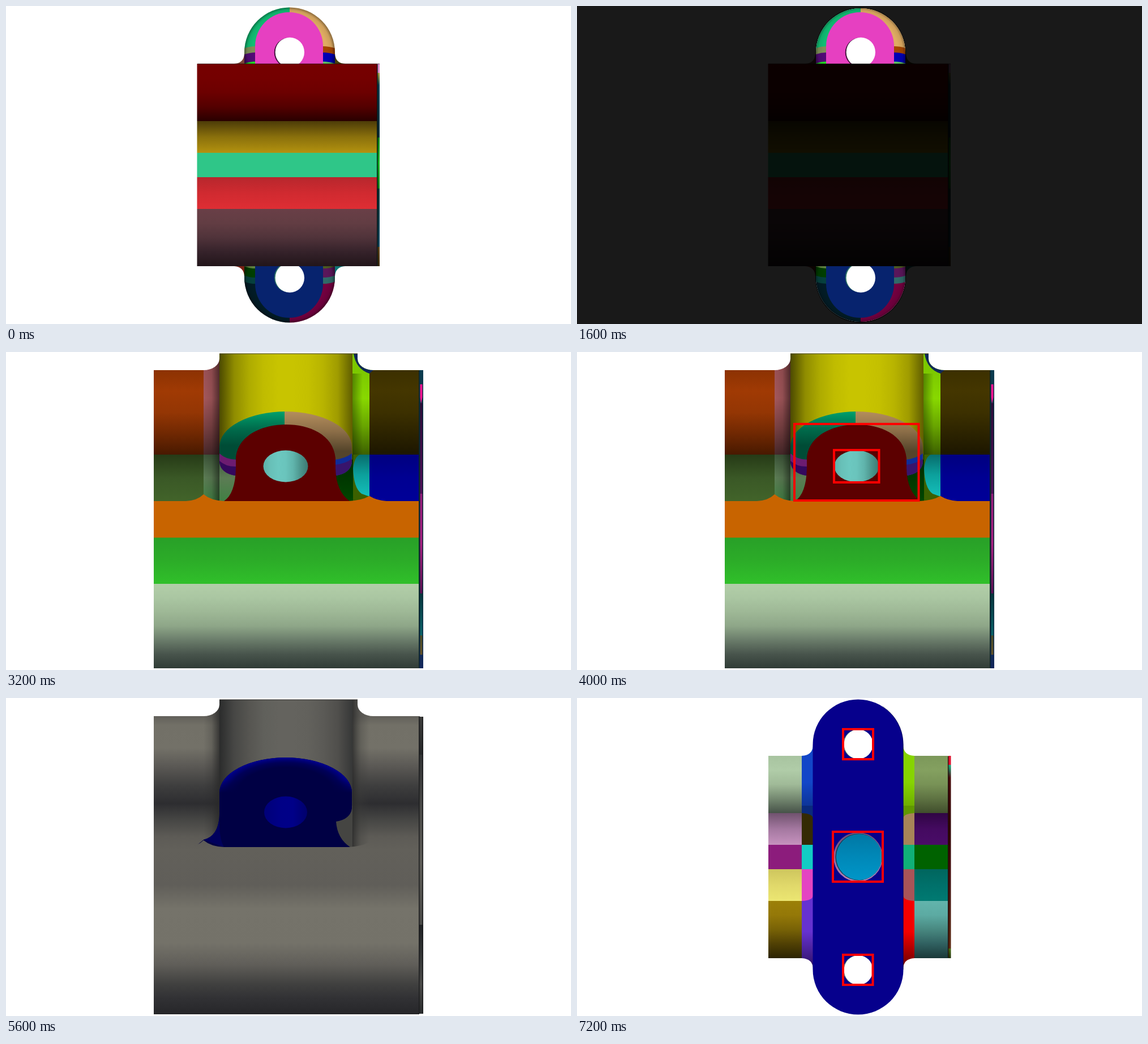
Recreate the animation shown at these times as an HTML page with a canvas. Size 998x561 px, loop 8000 ms.

```html
<!DOCTYPE html>
<html lang="en">
<head>
<meta charset="utf-8">
<title>Part segmentation</title>
<style>
html, body { margin: 0; width: 100%; height: 100%; overflow: hidden; background: #fff; }
canvas { display: block; }
</style>
</head>
<body>
<canvas id="stage" width="998" height="561"></canvas>
<script>
const ctx = document.getElementById('stage').getContext('2d');
const W = 998, H = 561, STEP = 800, TAU = Math.PI * 2;

function ramp(x0, y0, x1, y1, colors) {
  if (colors.length === 1) return colors[0];
  const g = ctx.createLinearGradient(x0, y0, x1, y1);
  colors.forEach((c, i) => g.addColorStop(i / (colors.length - 1), c));
  return g;
}
const down = (y0, y1, ...colors) => ramp(0, y0, 0, y1, colors);
const across = (x0, x1, ...colors) => ramp(x0, 0, x1, 0, colors);

function greyRamp(points) {
  const y0 = points[0][0], y1 = points[points.length - 1][0];
  const g = ctx.createLinearGradient(0, y0, 0, y1);
  for (const [y, v] of points) {
    const blue = v > 60 ? v - (v - 60) * 0.2 : v + 3;
    g.addColorStop((y - y0) / (y1 - y0), `rgb(${v},${v - (v > 90 ? 2 : 0)},${blue})`);
  }
  return g;
}
function rect(x0, y0, x1, y1, fill) {
  ctx.fillStyle = fill;
  ctx.fillRect(x0, y0, x1 - x0, y1 - y0);
}
function bands(x0, x1, list) {
  for (const [y0, y1, ...colors] of list) rect(x0, y0, x1, y1, down(y0, y1, ...colors));
}
function shape(d, fill) {
  ctx.fillStyle = fill;
  ctx.fill(new Path2D(d));
}
function oval(x, y, rx, ry, fill) {
  ctx.fillStyle = fill;
  ctx.beginPath();
  ctx.ellipse(x, y, rx, ry, 0, 0, TAU);
  ctx.fill();
}
function clipped(path, draw) {
  ctx.save();
  ctx.clip(path);
  draw();
  ctx.restore();
}
function flipped(draw) {
  ctx.save();
  ctx.transform(1, 0, 0, -1, 0, H);
  draw();
  ctx.restore();
}
function boxes(...list) {
  ctx.strokeStyle = '#f00';
  ctx.lineWidth = 4;
  for (const [x0, y0, x1, y1] of list) ctx.strokeRect(x0, y0, x1 - x0, y1 - y0);
}
function spotlight(scene, mask) {
  scene();
  rect(0, 0, W, H, 'rgba(0,0,0,0.9)');
  clipped(mask, scene);
}

// Front view
const LUG = 'M421 102V82A80 79.5 0 0 1 581 82V102Z';
const LUG_FLARE = 'M403 102Q420 101 421 84V102ZM599 102Q582 101 581 84V102Z';

function rimShade(strength) {
  const g = ctx.createRadialGradient(501, 82, 66, 501, 82, 80);
  g.addColorStop(0, 'rgba(0,0,0,0)');
  g.addColorStop(0.6, `rgba(0,0,0,${strength * 0.2})`);
  g.addColorStop(1, `rgba(0,0,0,${strength})`);
  rect(420, 0, 582, 103, g);
}
function lug(c) {
  shape('M403 102Q420 101 421 84V102Z', c.flare[0]);
  shape('M599 102Q582 101 581 84V102Z', c.flare[1]);
  clipped(new Path2D(LUG), () => {
    rect(420, 0, 501, 103, c.rim[0]);
    rect(501, 0, 582, 103, c.rim[1]);
    [71, 82, 98].forEach((y, i) => {
      shape(`M420 ${y + 4}Q430 ${y} 441 ${y}V103H420Z`, c.left[i]);
      shape(`M582 ${y + 4}Q572 ${y} 559 ${y}V103H582Z`, c.right[i]);
    });
    rimShade(0.4);
  });
  shape('M440 103V71A60 60 0 0 1 560 71V103Z', c.face);
  oval(499.7, 82, 26, 26, c.bore);
  oval(501.3, 81.5, 25.7, 26, '#fff');
}
function frontColor() {
  rect(0, 0, W, H, '#fff');
  lug({
    flare: ['#7c4638', '#45400c'], rim: ['#10be74', '#dfac62'], face: '#e640c1', bore: '#40103a',
    left: ['#7f9058', '#520b75', '#22e022'], right: ['#a54500', '#0000b4', '#60c462']
  });
  flipped(() => lug({
    flare: ['#7a2014', '#0f7474'], rim: ['#021c26', '#72003f'], face: '#07236e', bore: '#2f7468',
    left: ['#06403e', '#003e00', '#5f8040'], right: ['#2f6a68', '#5a165a', '#4c5a20']
  }));
  bands(337.5, 656, [
    [102, 203, '#760000', '#740000', '#6c0000', '#540000', '#290000'],
    [203, 259, '#4c3b08', '#8a700c', '#b3920f'],
    [259, 302, '#2fc688'],
    [302, 358, '#b7272d', '#d02a30', '#df2e34'],
    [358, 459, '#693f47', '#623d43', '#50333a', '#35222a', '#22151a']
  ]);
  bands(656, 660, [
    [102, 118, '#d88cc8'], [118, 140, '#a8a03c', '#0a3c4c'], [140, 232, '#0b3c50', '#062c34'],
    [232, 322, '#0a7a18', '#12b020', '#0a7a18'], [322, 425, '#0a3434', '#0c4058'], [425, 459, '#5c4018', '#382808']
  ]);
  rect(655, 103, 656.5, 458, '#061414');
  rect(338, 101.5, 660, 102.5, 'rgba(0,0,0,0.55)');
}
function frontGrey() {
  rect(0, 0, W, H, '#fff');
  const part = color => {
    shape(LUG + LUG_FLARE, color);
    clipped(new Path2D(LUG), () => rimShade(0.35));
    oval(501, 81.5, 26, 26, '#fff');
  };
  part('#6e1008');
  flipped(() => part('#1a2608'));
  rect(337.5, 102, 660, 459, greyRamp([
    [102, 88], [112, 114], [135, 116], [160, 92], [185, 60], [203, 44], [215, 52], [238, 82], [258, 99],
    [302, 97], [335, 117], [372, 117], [395, 94], [430, 54], [445, 44], [459, 37]
  ]));
  bands(655, 660, [
    [103, 140, '#3a3a38', '#505050', '#222'], [140, 230, '#222526', '#303234'],
    [230, 330, '#4c4b48', '#595854', '#4c4b48'], [330, 458, '#303234', '#1c1e20', '#303234']
  ]);
  rect(655, 103, 656.2, 458, '#1a1b1c');
  rect(338, 101.5, 660, 102.5, 'rgba(0,0,0,0.4)');
}
const frontMask = new Path2D('M422 102V82A79 78 0 0 1 580 82V102ZM422 459V479A79 78 0 0 0 580 479V459Z');

// Tilted view
const RIM = 'M377 167A117 62 0 0 1 611 167V195Q608 214 583 218H405Q380 214 377 195Z';
const FACE = 'M385 263Q405 250 406 205V187C410 145 455 128 495 128S578 145 582 187V205Q583 246 607 263Z';
const LOWER = 'M261 263H318Q338 262 349 251Q362 262 385 263H605Q628 262 642 254Q655 262 672 263H730V558H261Z';
const LEFT_FILLET = 'M349 32A28 20 0 0 0 377 12V263H349Z';
const RIGHT_FILLET = 'M612 3H621V12A28 20 0 0 0 649 32H642V263H612Z';

function tiltedColor() {
  rect(0, 0, W, H, '#fff');
  bands(261, 350, [
    [32, 181, '#8c3202', '#a03a04', '#943604', '#702802', '#481900'],
    [181, 264, '#263a16', '#3a5826', '#42642a']
  ]);
  bands(641, 731, [
    [32, 181, '#3c3000', '#443600', '#3c3000', '#2c2300', '#1c1600'],
    [181, 264, '#000080', '#000092', '#000098']
  ]);
  shape(LEFT_FILLET, down(32, 181, '#9c5256', '#a4585c', '#7c4244', '#48282a'));
  shape(RIGHT_FILLET, down(32, 181, '#7cc800', '#88d800', '#68a400', '#3c6000'));
  shape('M614 3H621V12A28 20 0 0 0 649 32L642 38Q618 30 614 3Z', '#102858');
  rect(349, 181, 406, 264, down(181, 263, '#3c5438', '#5c7c54', '#418044'));
  rect(583, 181, 613, 264, down(181, 263, '#002800', '#004600'));
  shape('M613 205Q616 184 625 181H642V255L628 250Q614 240 613 205Z', down(181, 252, '#086c6c', '#0ca09c', '#14bcb8'));
  shape(LEFT_FILLET, across(349, 377, 'rgba(0,0,0,0)', 'rgba(0,0,0,0.1)', 'rgba(0,0,0,0.5)'));
  rect(612, 38, 630, 181, across(612, 630, 'rgba(0,0,0,0.35)', 'rgba(0,0,0,0)'));
  rect(377, 3, 612, 190, across(377, 612, '#4c4a00', '#8f8c00', '#aeab00', '#c0bc00', '#c8c400', '#c8c400', '#c4c000', '#b8b400', '#a09c00', '#605e00'));
  rect(377, 2.5, 621, 3.5, '#383600');
  clipped(new Path2D(RIM), () => {
    rect(376, 100, 492, 220, down(105, 165, '#00a06c', '#006c4c', '#004c36'));
    rect(492, 100, 612, 220, down(105, 175, '#b48e5c', '#8c6e48', '#54442a'));
    shape('M376 178Q388 190 408 190V220H376Z', '#6c1c70');
    shape('M376 191Q388 203 408 202V220H376Z', '#34085c');
    shape('M612 178Q600 188 580 190V220H612Z', '#102c98');
    shape('M612 187Q602 197 580 199V220H612Z', '#38146c');
  });
  shape(FACE, '#5c0000');
  oval(494, 201.5, 39.5, 28, across(454, 534, '#5cb0a8', '#68c0b8', '#6cc8c0', '#6ac4bc', '#60b4ac', '#4c948c', '#3c7872'));
  shape(LOWER, '#c86400');
  bands(261, 730, [
    [327.5, 409, '#28a028', '#2cac28', '#30c02a'],
    [409, 558, '#b2cea8', '#aac6a2', '#9eb896', '#8ea688', '#6a7c6a', '#48544c', '#303c36']
  ]);
  bands(730, 737, [[32, 558, '#0a3c50', '#082c38', '#0a3038', '#06343c', '#14285c']]);
  bands(731.5, 735.5, [
    [90, 250, '#2c0c38', '#501058'], [250, 426, '#901c78', '#a42080', '#581050'],
    [426, 500, '#06343c', '#0a6468'], [500, 534, '#484c28', '#605028']
  ]);
  shape('M731.5 57H735.5V80L733 91L731.5 80Z', '#f41490');
  rect(729, 33, 730.5, 557, '#0c2428');
}
function tiltedGrey() {
  rect(0, 0, W, H, '#fff');
  const surface = greyRamp([
    [32, 98], [48, 114], [88, 115], [120, 91], [155, 62], [186, 45], [215, 70], [245, 93], [268, 98],
    [330, 96], [372, 117], [432, 116], [470, 96], [505, 64], [530, 49], [558, 38]
  ]);
  rect(261, 32, 350, 264, surface);
  rect(641, 32, 731, 264, surface);
  shape(LEFT_FILLET, surface);
  shape(RIGHT_FILLET, surface);
  rect(583, 181, 613, 264, '#454542');
  shape(LEFT_FILLET, across(349, 377, 'rgba(40,40,40,0)', 'rgba(40,40,40,0.2)', 'rgba(40,40,40,0.8)'));
  shape(RIGHT_FILLET, across(612, 642, 'rgba(40,40,40,0.8)', 'rgba(60,60,58,0.3)', 'rgba(60,60,58,0)'));
  rect(377, 3, 612, 190, across(377, 612, '#2b2c2c', '#474745', '#565551', '#60605b', '#64635e', '#64635e', '#62615c', '#5b5a56', '#504f4c', '#363737'));
  rect(377, 2.5, 621, 3.5, '#2c2c2c');
  shape('M338 259L349 250Q376 244 377 205V167A117 62 0 0 1 611 167V195Q608 214 583 218Q585 248 608 263H338Z', '#000044');
  const rim = ctx.createRadialGradient(0, 0, 84, 0, 0, 117);
  rim.addColorStop(0, '#000044');
  rim.addColorStop(0.5, '#000058');
  rim.addColorStop(1, '#00008e');
  clipped(new Path2D('M377 167A117 62 0 0 1 611 167Z'), () => {
    ctx.translate(494, 167);
    ctx.scale(1, 62 / 117);
    rect(-118, -118, 118, 0, rim);
    rect(-118, -45, 118, 0, down(-45, 0, 'rgba(0,0,68,0)', '#000044'));
  });
  shape('M349 250Q374 244 377 210Q376 248 385 263Z', '#00005c');
  oval(494, 201.5, 38, 28, across(456, 532, '#000078', '#000086', '#000088', '#00006c'));
  shape(LOWER, surface);
  bands(729, 737, [
    [33, 100, '#3c3c3b', '#242627'], [100, 290, '#303233', '#4a4a48', '#5c5b56'],
    [290, 400, '#5c5b56', '#484846'], [400, 557, '#202224', '#323435', '#4a4a48', '#2a2c2d']
  ]);
  rect(729, 33, 730.5, 557, '#1c1d1e');
  rect(735.5, 33, 737, 557, '#1c1d1e');
}
function tiltedMask() {
  const mask = new Path2D();
  mask.addPath(new Path2D(FACE), new DOMMatrix().translate(495, 200).scale(0.985).translate(-495, -200));
  mask.addPath(new Path2D('M379 180Q390 190 405 191V217Q384 214 379 200Z'));
  mask.addPath(new Path2D('M497 127V118L500 127Q522 119 541 122L543 115Q604 132 608 165L606 186Q597 190 584 188Q575 150 497 128Z'));
  mask.addPath(new Path2D('M587 193L607 186V203Q602 213 589 211L594 200Z'));
  const spot = (x, y, rx, ry) => {
    const p = new Path2D();
    p.ellipse(x, y, rx, ry, 0, 0, TAU);
    mask.addPath(p);
  };
  let seed = 11;
  const random = () => (seed = seed * 16807 % 2147483647) / 2147483647;
  for (let i = 0; i < 24; i++) {
    const a = Math.PI * (1 + 0.42 * i / 24), k = 0.94 + random() * 0.08;
    spot(494 + 101 * k * Math.cos(a), 176 + 54 * k * Math.sin(a), 2 + random() * 4, 1.5 + random() * 2.5);
  }
  spot(389, 175, 9, 9);
  spot(398, 134, 7, 4);
  spot(487, 121, 4, 4);
  spot(497, 108, 4, 1.5);
  spot(381, 216, 2, 6);
  spot(382, 254, 6, 3);
  return mask;
}
function tiltedDark() {
  spotlight(tiltedColor, tiltedMask());
  for (const [x, y, r] of [[519, 128, 3], [541, 129, 5], [555, 133, 4], [573, 144, 5], [590, 160, 4], [588, 145, 3], [570, 127, 3], [600, 178, 3]])
    oval(x, y, r, r * 0.9, '#0d0a06');
}

// Rear view
function rearColor() {
  rect(0, 0, W, H, '#fff');
  bands(338, 398, [
    [102, 203, '#a8c4a0', '#b0cca8', '#a0ba98', '#748870', '#465248'],
    [203, 259, '#70526e', '#a478a0', '#c692be'],
    [259, 302, '#8c1c7c'],
    [302, 358, '#cec65e', '#e0d86a', '#ece672'],
    [358, 459, '#9c8008', '#947808', '#786206', '#504004', '#2c2402']
  ]);
  bands(596, 656, [
    [102, 203, '#7c985a', '#84a060', '#789256', '#5e7242', '#404e2c'],
    [203, 259, '#300644', '#440a60', '#4a0c68'],
    [259, 302, '#006200'],
    [302, 358, '#00665e', '#00706a', '#007a72'],
    [358, 459, '#62b4ac', '#5caaa2', '#488880', '#306060', '#1a3838']
  ]);
  const fillet = (inner, outer, c) => {
    const outline = new Path2D(`M${outer} 102Q${inner} 101 ${inner} 82V479Q${inner} 460 ${outer} 459Z`);
    clipped(outline, () => {
      const x0 = Math.min(inner, outer), x1 = Math.max(inner, outer);
      bands(x0, x1, [[82, 215, c[0], c[0], c[1]], [203, 259, c[2]], [259, 302, c[3]], [302, 358, c[4]], [345, 479, c[5], c[5], c[6]]]);
      shape(`M${outer} 203Q${inner} 204 ${inner} 213V190H${outer}Z`, c[1]);
      shape(`M${outer} 358Q${inner} 357 ${inner} 348V302H${outer}Z`, c[4]);
    });
  };
  fillet(417, 397, ['#1246c8', '#0a2a7c', '#342a04', '#12ccc4', '#e444c2', '#6632d0', '#2c1060']);
  fillet(576, 596, ['#86d400', '#609800', '#a88458', '#10b078', '#a85458', '#f40000', '#600000']);
  shape('M416.5 82A80 79.5 0 0 1 576.5 82V479A80 79.5 0 0 1 416.5 479Z', '#06008c');
  ctx.strokeStyle = 'rgba(0,0,40,0.5)';
  ctx.lineWidth = 1;
  ctx.stroke(new Path2D('M576 479V82A80 79.5 0 0 0 540 15'));
  bands(656, 660.5, [
    [102, 118, '#e01430'], [118, 140, '#14b080', '#481010'], [140, 320, '#480c0c', '#300606', '#480c0c'],
    [320, 442, '#401010', '#5c2810'], [442, 459, '#487018', '#203008']
  ]);
  rect(655, 103, 656.2, 458, '#1c0808');
  for (const y of [81.5, 480]) {
    oval(496.3, y, 26, 26, '#6a8c78');
    oval(497.2, y, 25.5, 26, '#fff');
  }
  oval(496.5, 280.5, 43.5, 43.5, down(237, 324, '#684a78', '#8c64a0', '#b484b4'));
  oval(497.3, 280.5, 41, 41, '#103848');
  oval(498.2, 280.5, 40.5, 40.5, down(240, 321, '#0078a4', '#0088b8', '#0096c8'));
}

const scenes = [
  frontColor,
  () => {
    frontColor();
    boxes([419, 3, 583, 103], [473, 55, 528, 103], [419, 459, 583, 557], [473, 459, 528, 506]);
  },
  () => spotlight(frontColor, frontMask),
  frontGrey,
  tiltedColor,
  () => {
    tiltedColor();
    boxes([384, 127, 603.5, 262], [454, 173, 533.5, 230]);
  },
  tiltedDark,
  tiltedGrey,
  rearColor,
  () => {
    rearColor();
    boxes([470, 55, 523, 108], [452, 236, 540, 324], [470, 453, 522.5, 506]);
  }
];

let shown = -1;
function tick() {
  const index = Math.floor(performance.now() / STEP) % scenes.length;
  if (index !== shown) scenes[shown = index]();
  requestAnimationFrame(tick);
}
tick();
</script>
</body>
</html>
```
